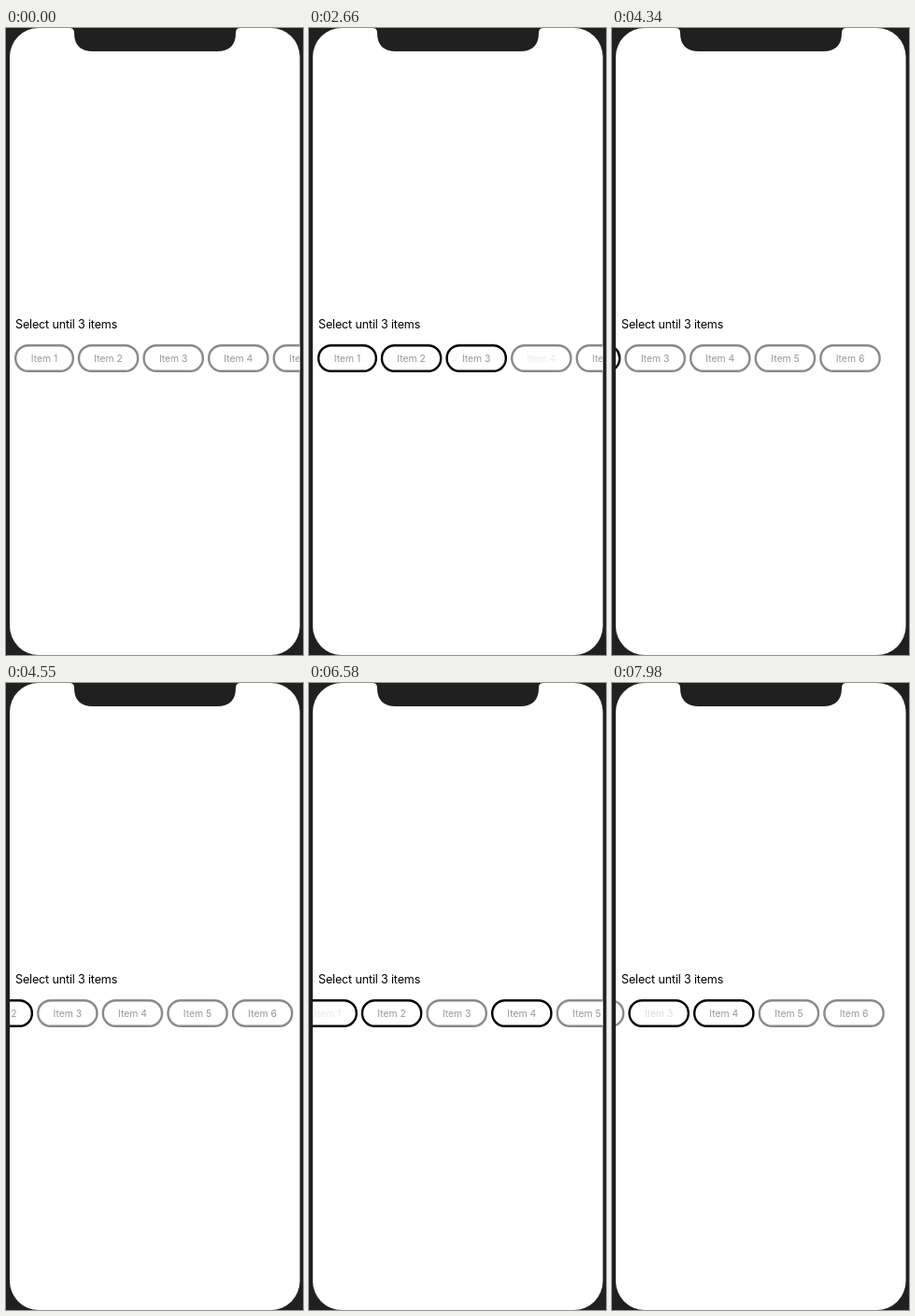
An HTML page for the animation above (8000 ms loop, 318 by 672 pixels).

```html
<!DOCTYPE html>
<html lang="en">
<head>
<meta charset="utf-8">
<title>Select items</title>
<style>
  html, body { margin: 0; width: 100%; height: 100%; overflow: hidden; background: #202020; }
  svg { display: block; width: 318px; height: 672px; font-family: Inter, Roboto, sans-serif; }
  .title { font-size: 12.6px; letter-spacing: -0.18px; fill: #000; }
  .pill { fill: #fff; stroke-width: 2.4px; }
  .label { font-size: 10.4px; letter-spacing: -0.02px; fill: #989898; text-anchor: middle; }
</style>
</head>
<body>
<svg viewBox="0 0 318 672">
  <defs>
    <clipPath id="screen"><rect x="4" y="0" width="310.6" height="672" rx="31"/></clipPath>
  </defs>
  <rect width="318" height="672" fill="#202020"/>
  <g clip-path="url(#screen)">
    <rect width="318" height="672" fill="#fff"/>
    <path fill="#202020" d="M68 0Q73 0 73 5Q73 25 93 25H226Q246 25 246 5Q246 0 251 0Z"/>
    <text class="title" x="10" y="321.5">Select until 3 items</text>
    <g id="row"></g>
  </g>
</svg>
<script>
const LOOP = 8000, STEP = 70, HOLD = 100, FADE = 250, DIM = 0.2, LIMIT = 3;

// A press on an item; a drag fades the label but does not select.
const tap = (item, at) => ({ item, at, selects: true });
const drag = (item, at) => ({ item, at, selects: false });
const touches = [
  tap(1, 710), tap(2, 1260), tap(3, 1820), tap(4, 2660), tap(3, 3360), drag(4, 3890),
  tap(4, 4830), drag(4, 5310), tap(1, 6580), tap(2, 7000), tap(3, 7420), drag(3, 7810)
];

// Scroll moves: throw past the end, spring back, return, throw again.
const glides = [
  { at: 3990, time: 330, to: 133 },
  { at: 4340, time: 350, to: 112 },
  { at: 5320, time: 350, to: 21 },
  { at: 7810, time: 170, to: 129 }
];

const clamp = v => Math.min(1, Math.max(0, v));
const easeOut = p => 1 - (1 - p) ** 3;
const easeInOut = p => p < 0.5 ? 2 * p * p : 1 - 2 * (1 - p) ** 2;

const row = document.getElementById('row');

function add(tag, attrs) {
  const el = document.createElementNS('http://www.w3.org/2000/svg', tag);
  for (const key in attrs) el.setAttribute(key, attrs[key]);
  return row.appendChild(el);
}

function makeItem(n) {
  const x = n === 1 ? 9 : 76.8 + (n - 2) * 69.6;
  const w = n === 1 ? 64 : 65.6;
  const pill = add('rect', { class: 'pill', x: x + 1.2, y: 340.2, width: w - 2.4, height: 27.6, rx: 13.6 });
  const label = add('text', { class: 'label', x: x + w / 2, y: 358 });
  label.textContent = 'Item ' + n;
  return { n, pill, label };
}

const items = [1, 2, 3, 4, 5, 6].map(makeItem);

const scrollAt = t => glides.reduce(
  (x, g) => x + (g.to - x) * easeOut(clamp((t - g.at) / g.time)), 0);

function selectionAt(t) {
  const chosen = new Set();
  for (const { item, at, selects } of touches) {
    if (!selects || t < at + HOLD) continue;
    if (!chosen.delete(item) && chosen.size < LIMIT) chosen.add(item);
  }
  return chosen;
}

function opacityAt(n, t) {
  const last = touches.filter(p => p.item === n && p.at <= t).pop();
  if (!last) return 1;
  return DIM + (1 - DIM) * easeInOut(clamp((t - last.at - HOLD) / FADE));
}

function draw(now) {
  const t = Math.floor((now % LOOP) / STEP) * STEP;
  const chosen = selectionAt(t);
  row.setAttribute('transform', `translate(${-scrollAt(t)} 0)`);
  for (const { n, pill, label } of items) {
    pill.setAttribute('stroke', chosen.has(n) ? '#000' : '#8a8a8a');
    label.setAttribute('opacity', opacityAt(n, t));
  }
}

const start = performance.now();
function tick() {
  draw(performance.now() - start);
  requestAnimationFrame(tick);
}
tick();
</script>
</body>
</html>
```
